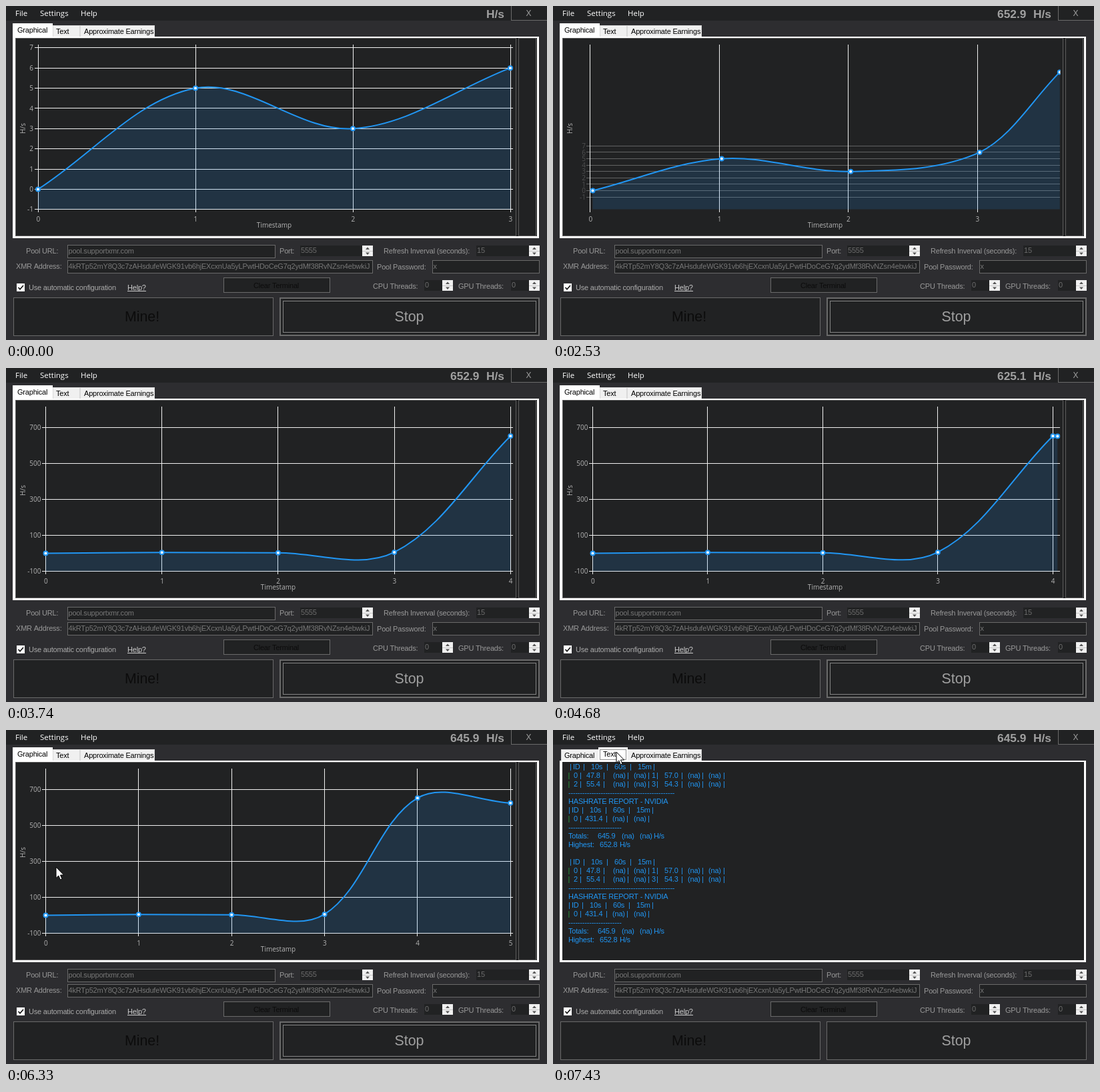
Animation of 811x502 px, one loop 8 s. Source, as an HTML page with a canvas:

```html
<!DOCTYPE html>
<html lang="en">
<head>
<meta charset="utf-8">
<title>Miner dashboard</title>
<style>
html, body { margin: 0; width: 811px; height: 502px; overflow: hidden; background: #2d2d30; }
canvas { display: block; }
</style>
</head>
<body>
<canvas id="stage" width="811" height="502"></canvas>
<script>
const ctx = document.getElementById('stage').getContext('2d');
const LOOP = 8000;
const DARK = '#212223', BODY = '#2d2d30', EDGE = '#6a6a6a', BLUE = '#2196f3';
const UI = '11px "Liberation Sans", Arial, sans-serif';
const MENU = '11.5px "Open Sans", "Noto Sans", sans-serif';
const AXIS = '10px "Open Sans", "Noto Sans", sans-serif';
const BIG = '21.33px "Liberation Sans", Arial, sans-serif';
const RATE = 'bold 17.33px "Liberation Sans", Arial, sans-serif';
const ADDRESS = '4kRTp52mY8Q3c7zAHsdufeWGK91vb6hjEXcxnUa5yLPwtHDoCeG7q2ydMf38RvNZsn4ebwkiJ';

// ---------- helpers ----------
const mix = (a, b, p) => a + (b - a) * p;
const mixAll = (a, b, p) => a.map((v, i) => mix(v, b[i], p));
const pick = (list, t) => list.filter(s => s[0] <= t).pop();

function rect(x, y, w, h, color) {
  ctx.fillStyle = color;
  ctx.fillRect(x, y, w, h);
}

function box(x, y, w, h, fill, edge = EDGE) {
  rect(x, y, w, h, edge);
  rect(x + 1, y + 1, w - 2, h - 2, fill);
}

function text(str, x, y, color, font = UI, align = 'left') {
  ctx.font = font;
  ctx.letterSpacing = font === UI ? '-0.2px' : '0px';
  ctx.textAlign = align;
  ctx.fillStyle = color;
  ctx.fillText(str, x, y);
}

function path(points, color) {
  ctx.fillStyle = color;
  ctx.beginPath();
  points.forEach(([x, y]) => ctx.lineTo(x, y));
  ctx.closePath();
  ctx.fill();
}

// ---------- chart ----------
// axis: x of zero, px per x unit, y of zero, px per y unit
const EARLY = [48, 236, 275.4, 30.375];
const MID = [59.5, 174.2, 278.5, 0.27];
const LATE = [59.5, 139.35, 278.5, 0.27];
const SMALL = [-1, 0, 1, 2, 3, 4, 5, 6, 7];
const LARGE = [-100, 100, 300, 500, 700];
const DATA = [0, 5, 3, 6, 652.9, 625.1];

function place(count, axis, repeatLast = false) {
  const pts = DATA.slice(0, count).map((v, i) =>
    [axis[0] + axis[1] * i, axis[2] - axis[3] * v]);
  if (repeatLast) pts.push(pts[count - 1]);
  return pts;
}

// flat list: start, then two handles and an end for each piece
function smooth(pts) {
  const out = [...pts[0]];
  const dist = (a, b) => Math.hypot(a[0] - b[0], a[1] - b[1]);
  const half = (a, b) => mixAll(a, b, 0.5);
  for (let i = 0; i + 1 < pts.length; i++) {
    const b = pts[i], c = pts[i + 1], a = pts[i - 1] || b, d = pts[i + 2] || c;
    const l1 = dist(a, b), l2 = dist(b, c), l3 = dist(c, d);
    const m1 = half(a, b), m2 = half(b, c), m3 = half(c, d);
    const n1 = mixAll(m1, m2, l1 / (l1 + l2 || 1));
    const n2 = mixAll(m2, m3, l2 / (l2 + l3 || 1));
    out.push(...b.map((v, k) => v + (m2[k] - n1[k]) * 0.7));
    out.push(...c.map((v, k) => v + (m2[k] - n2[k]) * 0.7));
    out.push(...c);
  }
  return out;
}

const SHIFTED = [59.5, ...EARLY.slice(1)];
const still = smooth(place(4, EARLY));
const PHASES = {
  start: { axes: [EARLY, EARLY], curves: [still, still], ticks: [SMALL, SMALL] },
  grow: {
    axes: [EARLY, MID], ticks: [SMALL, LARGE],
    curves: [smooth(place(4, SHIFTED, true)), smooth(place(5, MID))]
  },
  next: {
    axes: [MID, LATE], ticks: [LARGE, LARGE],
    curves: [smooth(place(5, MID, true)), smooth(place(6, LATE))]
  }
};
const CHART = [
  [0, 'start', 0], [2020, 'grow', 0], [2340, 'grow', 0.1], [2530, 'grow', 0.69],
  [3200, 'grow', 0.88], [3740, 'grow', 1], [4450, 'next', 0], [4680, 'next', 0.05],
  [5160, 'next', 1]
];

function drawGrid(axis, ticks, alpha) {
  const [x0, , y0, sy] = axis;
  ctx.globalAlpha = alpha;
  for (const v of ticks) {
    const y = y0 - sy * v;
    if (y < 58 || y > 307) continue;
    rect(Math.floor(x0) - 5, Math.floor(y), 765 - Math.floor(x0), 1, '#f0f0f0');
    text(v, x0 - 7, y + 3.6, '#b4b4b4', AXIS, 'right');
  }
  ctx.globalAlpha = 1;
}

function trace(c) {
  ctx.moveTo(c[0], c[1]);
  for (let i = 2; i < c.length; i += 6) ctx.bezierCurveTo(...c.slice(i, i + 6));
}

function drawSeries(c) {
  ctx.save();
  ctx.beginPath();
  ctx.rect(40, 58, 720.5, 252);
  ctx.clip();

  ctx.beginPath();
  trace(c);
  ctx.lineTo(c[c.length - 2], 305.5);
  ctx.lineTo(c[0], 305.5);
  ctx.fillStyle = 'rgba(33,150,243,0.15)';
  ctx.fill();

  ctx.beginPath();
  trace(c);
  ctx.strokeStyle = BLUE;
  ctx.lineWidth = 2;
  ctx.stroke();

  for (let i = 0; i < c.length; i += 6) {
    ctx.beginPath();
    ctx.arc(c[i], c[i + 1], 3, 0, Math.PI * 2);
    ctx.fillStyle = '#fff';
    ctx.fill();
    ctx.stroke();
  }
  ctx.restore();
}

function drawChart(t) {
  const [, name, p] = pick(CHART, t);
  const { axes, curves, ticks } = PHASES[name];
  const axis = mixAll(axes[0], axes[1], p);
  box(14, 48, 751, 298, DARK, '#5c5c5c');
  box(768, 48, 27, 298, DARK, '#5c5c5c');

  if (ticks[0] === ticks[1]) drawGrid(axis, ticks[0], 1);
  else {
    drawGrid(axis, ticks[0], 1 - p);
    drawGrid(axis, ticks[1], p);
  }
  for (let i = 0; i < 6; i++) {
    const x = axis[0] + axis[1] * i;
    if (x > 761) break;
    rect(Math.floor(x), 58, 1, 252, '#f0f0f0');
    text(i, x + 0.3, 324, '#b4b4b4', AXIS, 'center');
  }
  drawSeries(mixAll(curves[0], curves[1], p));

  text('Timestamp', name === 'start' ? 402 : 408, 333, '#b4b4b4', AXIS, 'center');
  ctx.save();
  ctx.translate(28.5, 184);
  ctx.rotate(-Math.PI / 2);
  text('H/s', 0, 0, '#b4b4b4', AXIS, 'center');
  ctx.restore();
}

// ---------- text report ----------
function cells(y, row) {
  for (const [str, ...xs] of row) {
    for (const x of xs) text(str, x, y, BLUE);
  }
}

function drawReport() {
  const head = (y, dx) => cells(y, [['|', 25 + dx, 45 + dx, 80 + dx, 115 + dx, 150 + dx],
    ['ID', 30 + dx], ['10s', 57 + dx], ['60s', 92 + dx], ['15m', 127 + dx]]);
  const start = y => text('|', 22.5, y, '#2a9a3c');
  const cpu = (y, a, va, b, vb) => {
    start(y);
    cells(y, [['|', 40, 75, 111, 142, 155, 192, 223, 255], [a, 31], [va, 50], [b, 148],
      [vb, 167], ['(na)', 90, 121, 202, 233]]);
  };
  for (const top of [59, 202]) {
    const line = n => top + n * 13;
    head(line(0), 0);
    cpu(line(1), '0', '47.8', '1', '57.0');
    cpu(line(2), '2', '55.4', '3', '54.3');
    text('-'.repeat(46), 23, line(3), BLUE);
    text('HASHRATE REPORT - NVIDIA', 23, line(4), BLUE);
    head(line(5), -2);
    start(line(6));
    cells(line(6), [['|', 40, 79, 110, 142], ['0', 31], ['431.4', 48], ['(na)', 89, 121]]);
    text('-'.repeat(23), 23, line(7), BLUE);
    cells(line(8), [['Totals:', 23], ['645.9', 67], ['(na)', 103, 130], ['H/s', 151]]);
    cells(line(9), [['Highest:', 23], ['652.8', 70], ['H/s', 100]]);
  }
}

// ---------- window ----------
const RATES = [[0, ''], [710, '652.9'], [4020, '650.4'], [4260, '625.1'], [5770, '645.9']];

function drawTitle(t) {
  rect(0, 0, 811, 22, DARK);
  text('File', 14, 15, '#fff', MENU);
  text('Settings', 51, 15, '#fff', MENU);
  text('Help', 112, 15, '#fff', MENU);
  text(pick(RATES, t)[1], 666, 18, '#a0a0a0', RATE);
  text('H/s', 720, 18, '#a0a0a0', RATE);
  box(757, -1, 55, 23, DARK);
  text('X', 783.5, 15, '#a0a0a0', '12px "Liberation Sans", Arial, sans-serif', 'center');
}

function drawTabs(active, tip) {
  const tabs = [['Graphical', 12, 57, 17], ['Text', 70, 41, 75], ['Approximate Earnings', 111, 112, 117]];
  tabs.forEach(([label, x, w, tx], i) => {
    if (i === active) return;
    const hover = tip && tip[0] >= x && tip[0] < x + w && tip[1] >= 29 && tip[1] < 47;
    box(x, 29, w, 18, hover ? '#d8eaf9' : '#f0f0f0', '#d9d9d9');
    text(label, tx, 42, '#000');
  });
  const [label, x, w, tx] = tabs[active];
  rect(10, 46, 789, 303, '#fff');
  rect(x - 2, 26, w + 3, 21, '#fff');
  text(label, tx, 40, '#000');
  rect(14, 48, 782, 298, DARK);
  if (active === 1) {
    ctx.save();
    ctx.strokeStyle = '#222';
    ctx.lineWidth = 1;
    ctx.setLineDash([1, 1]);
    ctx.strokeRect(70.5, 29.5, 39, 15);
    ctx.restore();
  }
}

function spinner(x, y) {
  rect(x, y, 16, 16, '#f0f0f0');
  rect(x, y + 8, 16, 1, '#c8c8c8');
  path([[x + 5, y + 6], [x + 8, y + 2.5], [x + 11, y + 6]], '#555');
  path([[x + 5, y + 10.5], [x + 8, y + 14], [x + 11, y + 10.5]], '#555');
}

function number(value, x, y, w) {
  rect(x, y, w, 16, DARK);
  text(value, x + 1, y + 11, '#6d6d6d');
  spinner(x + w, y);
}

function field(value, x, y, w) {
  box(x, y, w, 20, DARK);
  ctx.save();
  ctx.beginPath();
  ctx.rect(x + 1, y, w - 3, 20);
  ctx.clip();
  text(value, x + 1.5, y + 13, '#777');
  ctx.restore();
}

function drawForm(focused) {
  const label = (str, x, y) => text(str, x, y, '#999');
  label('Pool URL:', 30, 372);
  field('pool.supportxmr.com', 92, 359, 312);
  label('Port:', 410, 372);
  number('5555', 441, 360, 93);
  label('Refresh Inverval (seconds):', 566, 372);
  number('15', 705, 360, 79);
  label('XMR Address:', 15, 395);
  field(ADDRESS, 92, 382, 458);
  label('Pool Password:', 556, 396);
  field('x', 639, 382, 161);

  box(16, 417, 12, 12, '#fff', '#fff');
  ctx.strokeStyle = '#111';
  ctx.lineWidth = 1.6;
  ctx.beginPath();
  ctx.moveTo(18.5, 423);
  ctx.lineTo(21, 425.8);
  ctx.lineTo(26, 420);
  ctx.stroke();
  text('Use automatic configuration', 34, 427, '#aaa');
  text('Help?', 182, 427, '#ccc');
  rect(182, 428, 28, 1, '#ccc');

  box(326, 408, 160, 23, DARK);
  text('Clear Terminal', 405, 424, '#0c0c0c', UI, 'center');
  label('CPU Threads:', 550, 425);
  number('0', 627, 412, 27);
  label('GPU Threads:', 678, 425);
  number('0', 757, 412, 27);

  box(11, 438, 390, 58, DARK);
  text('Mine!', 178, 474, '#0c0c0c', BIG);
  box(410, 438, 390, 58, DARK);
  if (focused) {
    box(411, 439, 388, 56, DARK);
    box(415, 443, 380, 48, DARK, '#858585');
  }
  text('Stop', 582.5, 474, '#a0a0a0', BIG);
}

// ---------- pointer ----------
function pointerAt(t) {
  if (t < 6330) return null;
  const u = Math.min(9, Math.floor((t - 6330) / 84.4)) / 9, v = 1 - u;
  const bend = (a, b, c) => Math.round(v * v * a + 2 * u * v * b + u * u * c);
  return [bend(75, 165, 95), bend(206, 10, 33)];
}

function drawPointer([x, y]) {
  const shape = [[0, 0], [0, 16.5], [3.8, 13], [6.4, 19], [9, 17.9], [6.5, 12], [11.6, 12]];
  const moved = shape.map(([a, b]) => [x + a, y + b]);
  path(moved, '#fff');
  ctx.strokeStyle = '#000';
  ctx.lineWidth = 1;
  ctx.stroke();
}

function draw(t) {
  const report = t >= 7430;
  const tip = pointerAt(t);
  rect(0, 0, 811, 502, BODY);
  drawTitle(t);
  drawTabs(report ? 1 : 0, tip);
  if (report) drawReport();
  else drawChart(t);
  drawForm(!report);
  if (tip) drawPointer(tip);
}

const begin = performance.now();
function tick() {
  draw((performance.now() - begin) % LOOP);
  requestAnimationFrame(tick);
}
tick();
</script>
</body>
</html>
```
